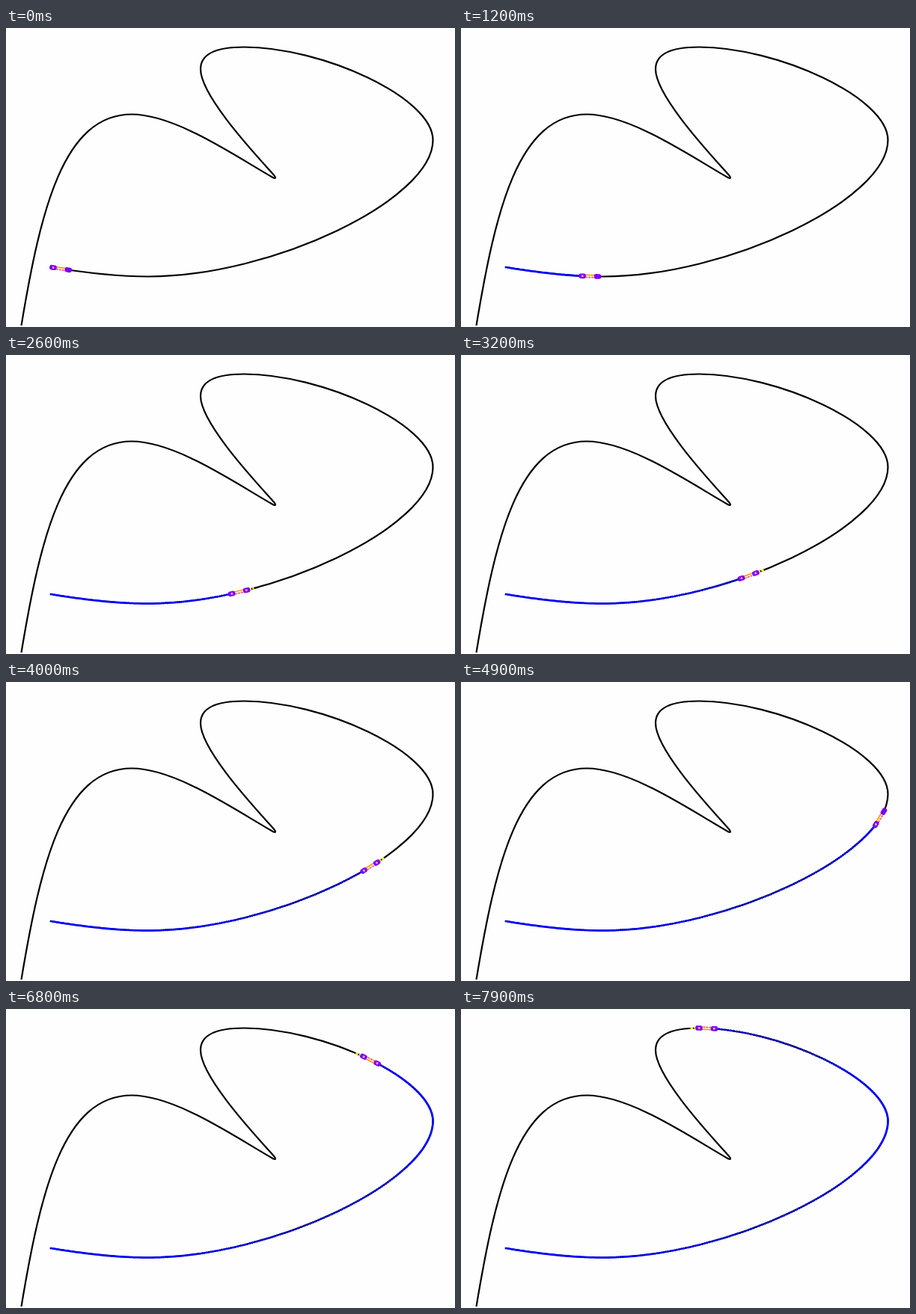
An HTML page that plays this animation: 600x400 px, repeating every 8000 ms.

```html
<!DOCTYPE html>
<html lang="en">
<head>
<meta charset="utf-8">
<title>Path follower</title>
<style>
  html, body { margin: 0; width: 100%; height: 100%; overflow: hidden; background: #fefefe; }
  svg { display: block; width: 600px; height: 400px; }
  path, line, polyline { fill: none; }
</style>
</head>
<body>
<svg viewBox="0 0 600 400">
  <path id="track" stroke="#000" stroke-width="2.2" d="M60 320
    C103 327 147 332.5 190 332.5
    C355.5 332.5 570.5 229.8 570.5 150
    C570.5 92.7 422 25.5 318 25.5
    C278 25.5 260 36 260 55
    C260 92 338 174 358.5 197.3
    C361 200.7 360.2 201.7 357 200.2
    C305 170.5 226 115.5 168 115.5
    C76 115.5 46 245 20.5 398"/>
  <path id="trail" stroke="#00f" stroke-width="3" stroke-linecap="round"/>
  <polyline id="lead" stroke="#ff0" stroke-width="2.4" stroke-dasharray="3.5 1.5"/>
  <g id="cart">
    <rect x="-10" y="-2" width="20" height="4" fill="#fff"/>
    <line x1="-10" x2="10" y1="-1.6" y2="-1.6" stroke="#ff8c1a" stroke-width="1.5"/>
    <line x1="-10" x2="10" y1="1.6" y2="1.6" stroke="#ff4d6a" stroke-width="1.5" stroke-dasharray="3 1"/>
    <line x1="-6" x2="6" y1="0" y2="0" stroke="#ffc21a" stroke-width="1.2" stroke-dasharray="2 2"/>
    <rect x="-15" y="-3.3" width="9.5" height="6.6" rx="2.8" fill="#7a00f5"/>
    <rect x="5.5" y="-3.3" width="9.5" height="6.6" rx="2.8" fill="#7a00f5"/>
    <circle id="rearHub" cx="-10" r="1.5" fill="#ffa0b8"/>
    <circle id="frontHub" cx="10" r="1.5" fill="#ffa0b8"/>
  </g>
</svg>
<script>
  const LOOP = 8000, STEP = 100, WHEELBASE = 20.5, DOT_EVERY = 27;
  const el = id => document.getElementById(id);
  const track = el('track'), trail = el('trail'), lead = el('lead'), cart = el('cart');

  // Time in ms and distance travelled by the rear axle
  const keys = [
    [0, 3], [900, 79], [1200, 102.8], [2000, 178], [2700, 255], [3200, 319.2], [3600, 378],
    [4500, 497], [4900, 531.5], [5400, 570], [6300, 640], [6800, 687.5], [7200, 750],
    [7900, 853], [8000, 867.5]
  ];
  const slope = (a, b) => (b[1] - a[1]) / (b[0] - a[0]);
  const speeds = keys.map((key, i) =>
    slope(keys[Math.max(i - 1, 0)], keys[Math.min(i + 1, keys.length - 1)]));

  function travelled(t) {
    let i = 0;
    while (i < keys.length - 2 && t >= keys[i + 1][0]) i++;
    const [t0, s0] = keys[i], [t1, s1] = keys[i + 1];
    const span = t1 - t0, u = (t - t0) / span, w = 1 - u;
    return s0 * w * w * (1 + 2 * u) + s1 * u * u * (1 + 2 * w)
      + span * u * w * (w * speeds[i] - u * speeds[i + 1]);
  }

  const at = s => track.getPointAtLength(s);
  const place = p => p.x.toFixed(2) + ' ' + p.y.toFixed(2);
  const dot = s => `M${place(at(s))}h0.01`;

  // One dot is dropped per fixed time, so dots spread out at speed
  const dots = [dot(0)];
  for (let t = 0; t < LOOP; t += DOT_EVERY) dots.push(dot(travelled(t)));

  function draw(t) {
    const s = travelled(t), front = s + WHEELBASE;
    const speed = (travelled(Math.min(t + 50, LOOP)) - travelled(Math.max(t - 50, 0))) * 10;
    const reach = Math.min(10, Math.max(0, (speed - 95) * 0.35));
    const a = at(s), b = at(front);
    const angle = Math.atan2(b.y - a.y, b.x - a.x) * 180 / Math.PI;

    trail.setAttribute('d', dots.slice(0, Math.floor(t / DOT_EVERY) + 2).join(''));
    lead.setAttribute('points', [0, 0.5, 1].map(k => place(at(front + 3 + k * reach))).join(' '));
    lead.setAttribute('visibility', reach > 1 ? 'visible' : 'hidden');
    el('frontHub').setAttribute('visibility', reach > 0 ? 'visible' : 'hidden');
    cart.setAttribute('transform',
      `translate(${(a.x + b.x) / 2} ${(a.y + b.y) / 2}) rotate(${angle})`);
  }

  const start = performance.now();
  function tick() {
    const t = (performance.now() - start) % LOOP;
    draw(Math.floor(t / STEP) * STEP);
    requestAnimationFrame(tick);
  }
  tick();
</script>
</body>
</html>
```
